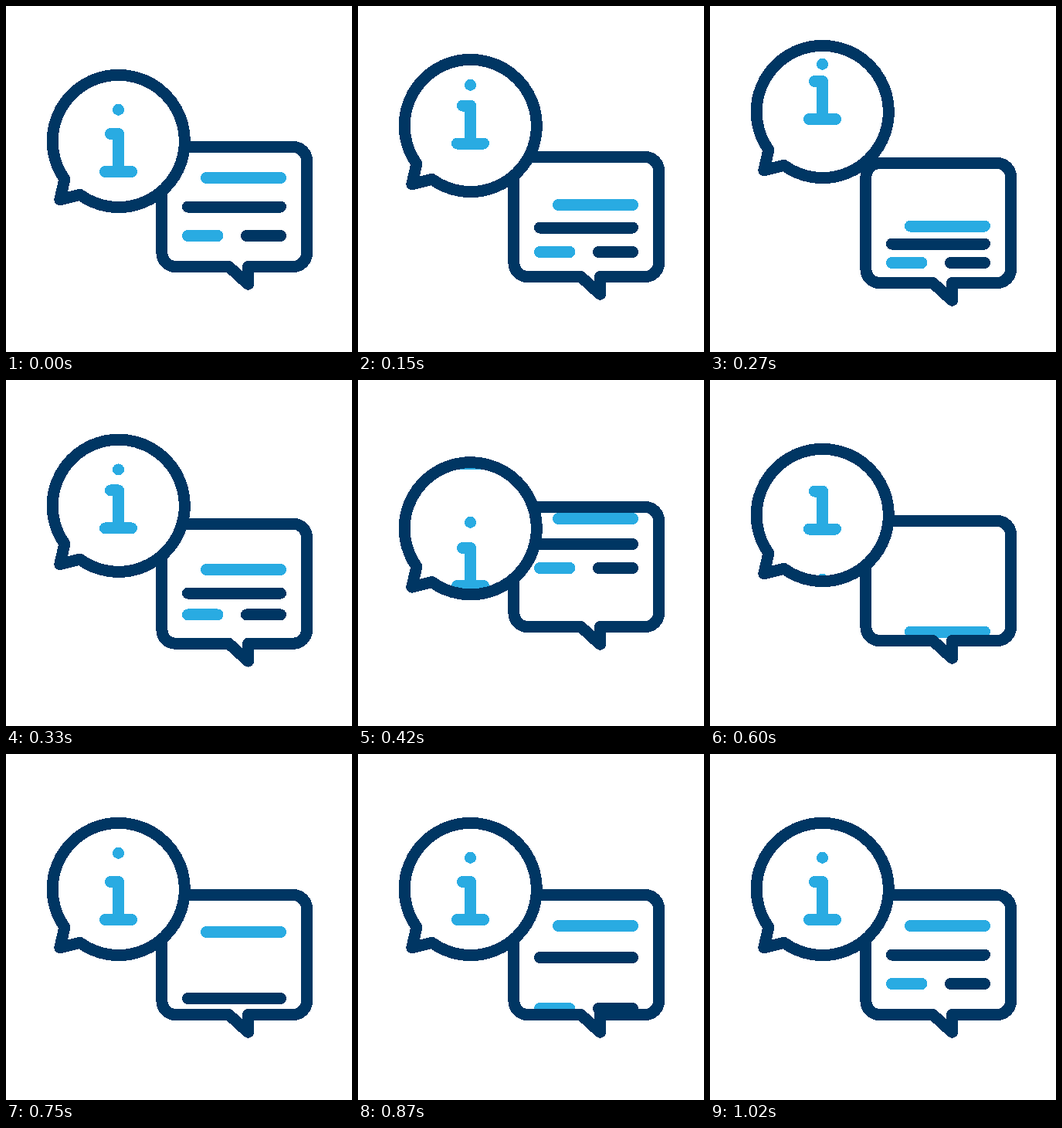
An HTML page that plays this animation: 448 by 448 pixels, repeating every 1.11 s.

```html
<!DOCTYPE html>
<html lang="en">
<head>
<meta charset="utf-8">
<title>Info chat bubbles</title>
<style>
  html, body { margin: 0; width: 100%; height: 100%; overflow: hidden; background: #fff; }
  svg { display: block; width: 100vw; height: 100vh; shape-rendering: crispEdges; }
  .ink { fill: none; stroke: #003663; stroke-width: 15; stroke-linecap: round; stroke-linejoin: round; }
  .sky { stroke: #29abe2; }
  .paper { fill: #fff; }
</style>
</head>
<body>
<svg viewBox="0 0 448 448">
  <defs>
    <path id="box" d="M288.5 337.5H219.4A17.5 17.5 0 0 1 201.9 320V200A17.5 17.5 0 0 1 219.4 182.5H372A17.5 17.5 0 0 1 389.5 200V320A17.5 17.5 0 0 1 372 337.5H313.5V360.3Z"/>
    <path id="round" d="M95.6 244.3A85.6 85.6 0 1 0 75.9 224.4L69.8 250.8Z"/>
    <clipPath id="boxClip"><use href="#box"/></clipPath>
    <clipPath id="roundClip"><use href="#round"/></clipPath>
    <path id="line1" class="ink sky" d="M259.5 222.5H355.5"/>
    <path id="line2" class="ink" d="M235.5 260H355.5"/>
    <g id="line3">
      <path class="ink sky" d="M235.5 297.5H274"/>
      <path class="ink" d="M311.5 297.5H355.5"/>
    </g>
    <path id="dot" class="ink sky" d="M145.5 134.3h.01"/>
    <path id="stem" class="ink sky" d="M135.5 165.5H145.5V214.5M128.5 214.5H162.5"/>
  </defs>
  <g id="boxBubble">
    <use href="#box" class="paper"/>
    <g clip-path="url(#boxClip)"></g>
    <use href="#box" class="ink"/>
  </g>
  <g id="roundBubble">
    <use href="#round" class="paper"/>
    <g clip-path="url(#roundClip)"></g>
    <use href="#round" class="ink"/>
  </g>
</svg>
<script>
  const STEP = 30, COUNT = 37;

  // Monotone cubic through [step, offset] keys, held at both ends.
  function curve(...keys) {
    const last = keys.length - 1;
    const rate = i => (keys[i + 1][1] - keys[i][1]) / (keys[i + 1][0] - keys[i][0]);
    const slope = keys.map((_, i) => {
      if (i === 0 || i === last) return 0;
      const a = rate(i - 1), b = rate(i);
      return a * b > 0 ? 2 * a * b / (a + b) : 0;
    });
    return x => {
      if (x <= keys[0][0]) return keys[0][1];
      if (x >= keys[last][0]) return keys[last][1];
      const i = keys.findIndex(k => k[0] > x) - 1;
      const [x0, y0] = keys[i], [x1, y1] = keys[i + 1];
      const w = x1 - x0, s = (x - x0) / w, r = 1 - s;
      return y0 * (1 + 2 * s) * r * r + y1 * s * s * (3 - 2 * s)
        + w * s * r * (slope[i] * r - slope[i + 1] * s);
    };
  }

  // Pull back, swing past, then travel on to the last offset.
  const swing = (a, peak, b, c, end) =>
    curve([2, 0], [5, a], [7.5, peak], [9, b], [14, c], [20, end]);

  const rise = curve([14, 210], [20, 103.5], [25, 8], [28, 0]);
  const riseAfter = delay => x => rise(x - delay);

  const bubbles = [
    { id: "boxBubble", move: swing(13, 26.3, 21, -18, 0), parts: [
      ["line1", swing(35, 72, 62.5, -43, -80)],
      ["line2", swing(27, 55, 48, -47.5, -120)],
      ["line3", swing(21, 42, 35, -54, -150)],
      ["line1", rise],
      ["line2", riseAfter(2.9)],
      ["line3", riseAfter(5.8)]
    ] },
    { id: "roundBubble", move: swing(-20, -49, -38, 17.3, 0), parts: [
      ["stem", swing(-36.5, -86, -68, 52, 135)],
      ["dot", curve([2, 0], [5, -32], [7.5, -74], [9, -59], [14, 50], [20, 124], [23, 150])],
      ["stem", curve([9, -240], [14, -106], [20, -21.5], [25, 0])],
      ["dot", curve([14, -150], [20, -55], [25, -6], [28, 0])]
    ] }
  ];

  for (const b of bubbles) {
    b.node = document.getElementById(b.id);
    const inner = b.node.querySelector("g");
    b.parts = b.parts.map(([shape, move]) => {
      const node = document.createElementNS("http://www.w3.org/2000/svg", "use");
      node.setAttribute("href", "#" + shape);
      inner.append(node);
      return { node, move };
    });
  }

  const shift = (node, y) => node.setAttribute("transform", `translate(0 ${y.toFixed(2)})`);

  const start = performance.now();
  function draw() {
    const x = Math.floor((performance.now() - start) / STEP) % COUNT;
    for (const b of bubbles) {
      const y = b.move(x);
      shift(b.node, y);
      for (const p of b.parts) shift(p.node, p.move(x) - y);
    }
    requestAnimationFrame(draw);
  }
  draw();
</script>
</body>
</html>
```
